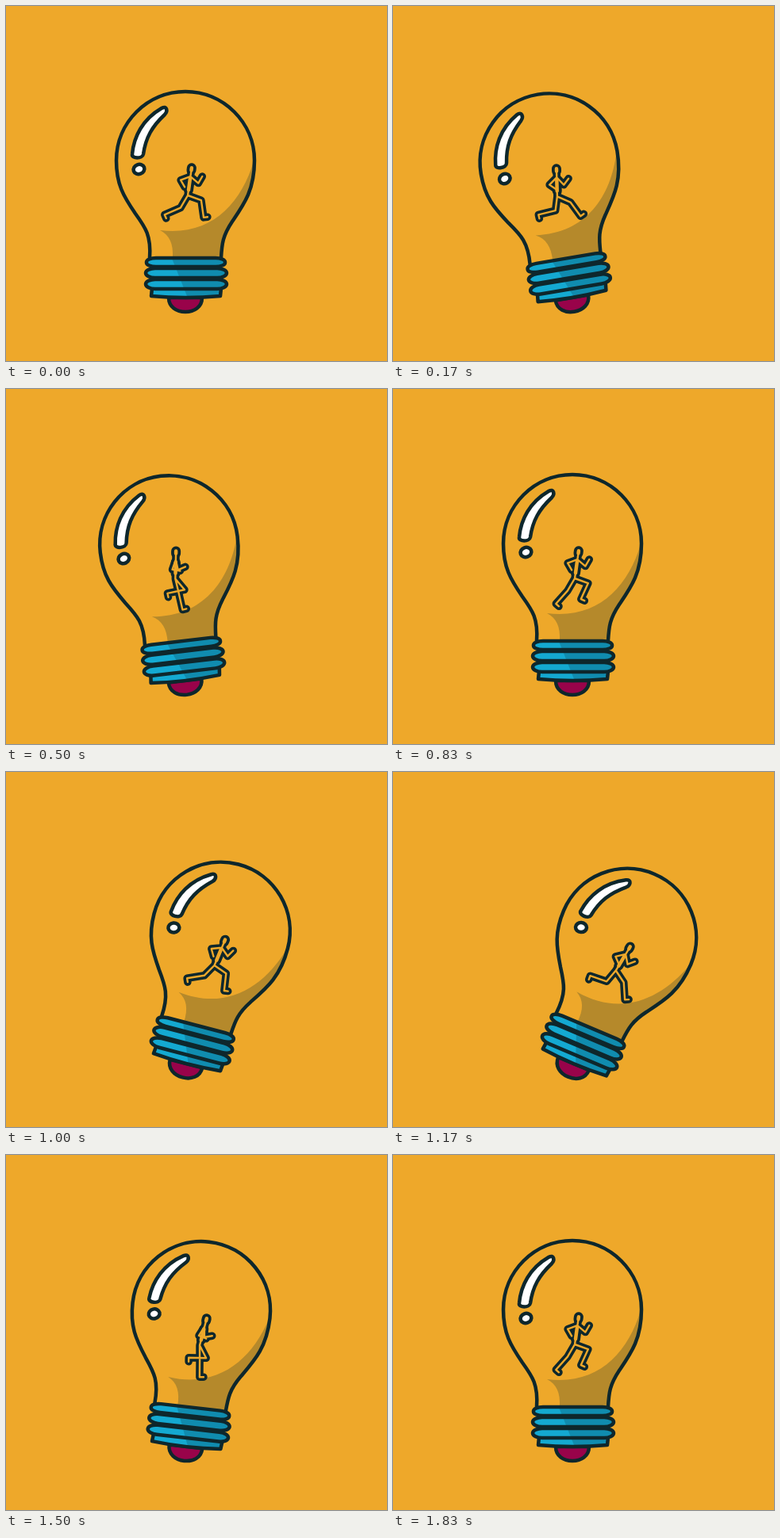
An HTML page for the animation above (1990 ms loop, 480 by 448 pixels).

```html
<!DOCTYPE html>
<html lang="en">
<head>
<meta charset="utf-8">
<title>Runner in a light bulb</title>
<style>
  html, body { margin: 0; width: 100%; height: 100%; overflow: hidden; background: #eea82a; }
  svg { display: block; width: 480px; height: 448px; }
  #bulb { stroke: #0e272c; stroke-width: 4.5; fill: none; stroke-linecap: round; stroke-linejoin: round; }
  .in { stroke: #eea82a; }
</style>
</head>
<body>
<svg viewBox="0 0 480 448">
  <defs>
    <linearGradient id="metal" gradientUnits="userSpaceOnUse" x1="217" y1="340" x2="218" y2="339.6">
      <stop offset="0" stop-color="#14a9d1"/>
      <stop offset="1" stop-color="#108caf"/>
    </linearGradient>
  </defs>
  <g id="bulb">
    <path fill="#b5892b" stroke="none" d="M312 196C296 250 258 291 194 283C206 289 211 300 210 318H271C272 300 273 290 285 272C300 250 312 232 312 196Z"/>
    <path d="M181 318C183 290 176 280 163 262C148 240 139 225 139 195C139 147 178 108 226 108C274 108 313 147 313 195C313 232 300 250 285 272C273 290 272 300 271 318"/>
    <path fill="#fff" d="M196 129C203 125 204 133 200 137C184 152 176 166 173 187C172 193 158 193 159 187C161 165 172 143 196 129Z"/>
    <ellipse fill="#fff" cx="167.5" cy="206" rx="7" ry="6" transform="rotate(-20 167.5 206)"/>
    <path fill="#99034a" d="M205 368C205 380 215 386 226 386C237 386 247 380 247 368Z"/>
    <g fill="url(#metal)">
      <path d="M184 356L183 366Q226 370 270 366L271 356Z"/>
      <rect x="176" y="345" width="102" height="12" rx="12" ry="6"/>
      <rect x="176" y="331" width="102" height="12" rx="12" ry="6"/>
      <rect x="177" y="318" width="99" height="11" rx="12" ry="5"/>
    </g>
    <path class="limbs" stroke-width="9.5"/>
    <path class="trunk" stroke-width="12"/>
    <path class="limbs in" stroke-width="2.4"/>
    <path class="trunk in" stroke-width="4.5"/>
  </g>
</svg>
<script>
const steps = 12, loop = 1990;
const bulb = document.getElementById("bulb");
const rad = deg => deg * Math.PI / 180;
const wave = step => Math.cos(2 * Math.PI * step / steps);
const line = (...pts) => "M" + pts.map(p => p.map(v => v.toFixed(1)).join(" ")).join("L");
const setPath = (name, d) =>
  document.querySelectorAll("." + name).forEach(el => el.setAttribute("d", d));

// Angles are in degrees from straight down, positive towards the front
const reach = ([x, y], length, angle) =>
  [x + length * Math.sin(rad(angle)), y + length * Math.cos(rad(angle))];

// Quick tip over to the peak, then an almost even return
function swing(step, from, peak, to, angle) {
  const out = Math.max(0, (step - from) / (peak - from));
  const back = Math.max(0, (to - step) / (to - peak));
  return angle * Math.min(out ** 0.65, back ** 1.15);
}

function leg(hip, step) {
  const thigh = 20 + 52 * wave(step + 0.5);
  const bend = 120 * ((1 - wave(step - 3.4)) / 2) ** 1.3;
  const knee = reach(hip, 18, thigh);
  const ankle = reach(knee, 22, thigh - bend);
  return line(hip, knee, ankle, reach(ankle, 5, thigh - bend + 90));
}

function arm(neck, step) {
  const upper = -10 - 62 * wave(step + 0.5);
  const elbow = reach(neck, 13, upper);
  return line(neck, elbow, reach(elbow, 10, upper + 100));
}

function drawRunner(step) {
  const hip = [229, 239], spine = 172;
  const at = height => reach(hip, height, spine);
  const other = step + steps / 2;
  setPath("trunk", line(at(32), at(35)) + line(at(7), at(21)));
  setPath("limbs", line(hip, at(32)) + arm(at(24), step) + arm(at(24), other) +
    leg(hip, step) + leg(hip, other));
}

function frame(now) {
  const t = now % loop;
  let step = 0;
  while (step < steps - 1 && Math.round((step + 1) * 100 / 6) * 10 <= t) step++;
  const angle = swing(step, 0, 2, 4, -15) + swing(step, 5, 7, 10, 23);
  bulb.setAttribute("transform", `translate(${angle * 0.05} 0) rotate(${angle} 226 369)`);
  drawRunner(step);
  requestAnimationFrame(frame);
}
frame(0);
</script>
</body>
</html>
```
